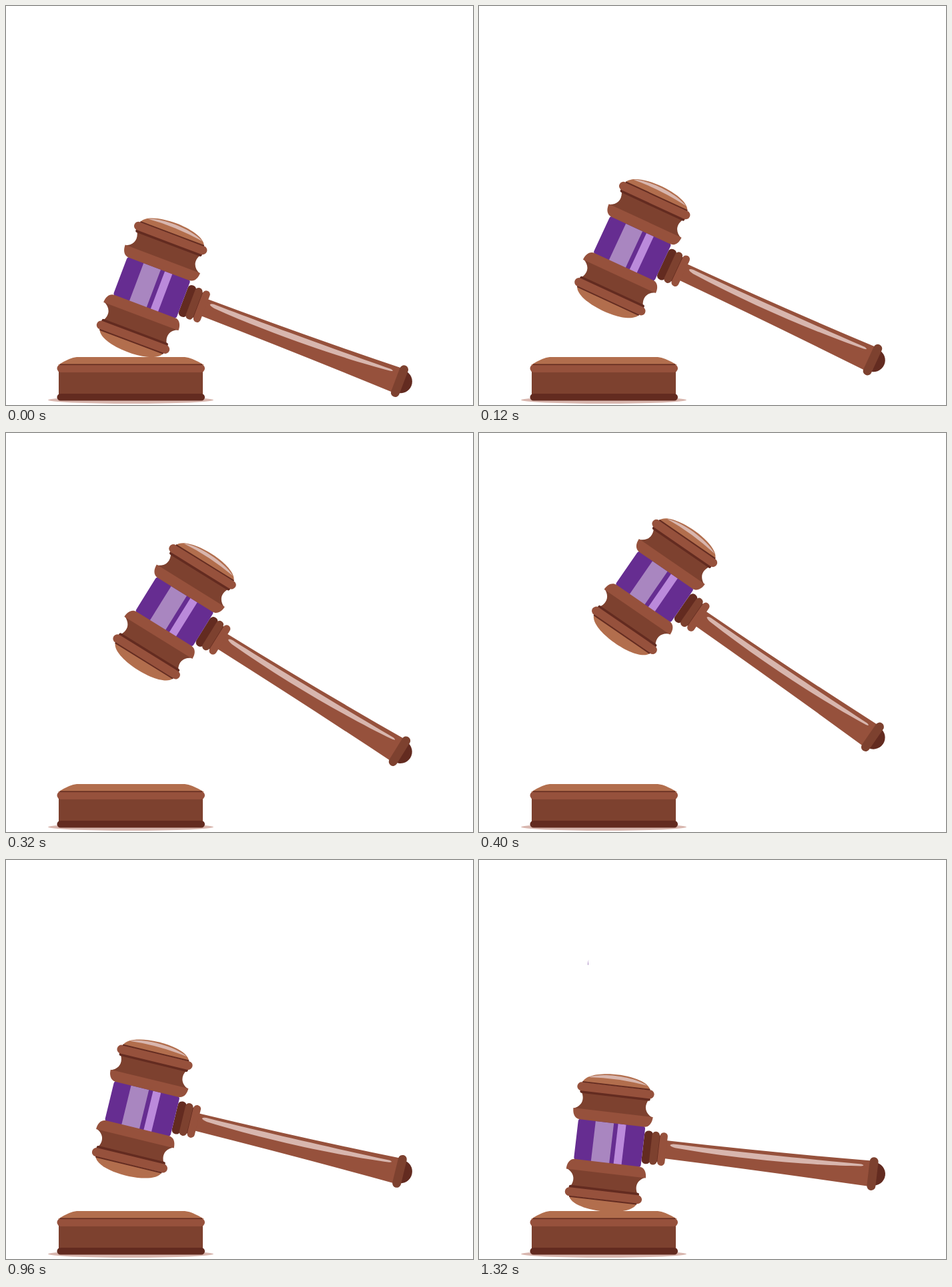
Write an HTML page that moves like this. It is 700 px wide and 599 px high and loops after 1.36 s.

```html
<!DOCTYPE html>
<html lang="en">
<head>
<meta charset="utf-8">
<title>Gavel</title>
<style>
  html, body { margin: 0; height: 100%; overflow: hidden; background: #fff; }
  svg { display: block; width: 100%; height: 100%; }
  .light { fill: #b26e4d; }
  .mid { fill: #96513c; }
  .deep { fill: #7d412f; }
  .dark { fill: #632b20; }
  .shine { fill: #d8b6ae; }
  .violet { fill: #662d91; }
</style>
</head>
<body>
<svg viewBox="0 0 700 599">
  <defs>
    <!-- one end of the head, centred on the head's axis -->
    <g id="cap">
      <path class="deep" d="M-51-72C-44-60-48-50-60-45H60C48-50 44-60 51-72Z"/>
      <path class="mid" d="M-60-46C-60-37-56-30-48-30H48C56-30 60-37 60-46Z"/>
      <rect class="dark" x="-53" y="-75" width="106" height="5.5" rx="2.5"/>
      <path class="light" d="M-51-86C-44-109 44-109 51-86Z"/>
      <rect class="mid" x="-58" y="-86" width="116" height="13" rx="6.5"/>
      <rect class="dark" x="-51" y="-87.5" width="102" height="2"/>
    </g>
    <mask id="ring" maskUnits="userSpaceOnUse" x="0" y="0" width="700" height="599">
      <rect width="700" height="599" fill="#fff"/>
      <circle id="hole" cx="132" cy="530"/>
    </mask>
  </defs>

  <ellipse class="shine" cx="187" cy="591.5" rx="124" ry="5.5"/>

  <!-- origin at the end of the handle, handle along the x axis -->
  <g id="gavel">
    <path class="mid" d="M-313-13.5Q-150-14 0-19.5V19.5Q-150 15-313 13.5Z"/>
    <path class="shine" d="M-306-7Q-305-10-296-9.5C-220-9-100-10.5-18-12.5Q-11-11-18-9.5C-90-2-200 2-298-4Q-305-5-306-7Z"/>
    <path class="dark" d="M2-17.5A17.5 17.5 0 0 1 2 17.5Z"/>
    <rect class="deep" x="-6" y="-25" width="13" height="50" rx="6.5"/>
    <rect class="dark" x="-346" y="-25" width="13" height="50" rx="6"/>
    <rect class="dark" x="-328" y="-20" width="10" height="40"/>
    <rect class="deep" x="-334.5" y="-25" width="11.5" height="50" rx="5.5"/>
    <rect class="mid" x="-322.3" y="-25" width="11.3" height="50" rx="5.5"/>
    <g transform="translate(-396.5)">
      <rect class="violet" x="-50.5" y="-31" width="101" height="62" rx="4"/>
      <path fill="#a986c0" d="M-24.5-30H3V31H-24.5Z"/>
      <path fill="#bb8adb" d="M9.5-30H21.5V31H9.5Z"/>
      <use href="#cap"/>
      <use href="#cap" transform="scale(1 -1)"/>
      <path class="shine" d="M-42-94.5C-24-103.5 24-103.5 46-92Q0-98.5-42-94.5Z"/>
    </g>
  </g>

  <path class="light" d="M78 539Q96 527.5 106 527H268Q278 527.5 297 539Z"/>
  <rect class="deep" x="79" y="546" width="216" height="38"/>
  <rect class="mid" x="76.5" y="538" width="221.5" height="12" rx="6"/>
  <rect class="dark" x="81" y="537.5" width="213" height="1.6"/>
  <rect class="dark" x="76.5" y="582" width="221.5" height="10.5" rx="5.2"/>

  <g mask="url(#ring)">
    <path id="burst" class="violet" d="M156 246Q154 310 139 403L152 373Q140 425 129 476
      Q127 455 125 436Q120 439 118 437C114 424 88 425 88 446Q72 448 70 460Q76 470 80 500
      Q70 487 62 488Q48 490 50 497Q62 500 63 512C34 508 28 542 50 548Q65 552 81 551
      Q60 562 44 586Q47 574 44 570Q30 572-10 594Q15 570 27 556Q18 554 8 557Q20 548 24 543
      Q10 533-30 532Q10 522 25 519Q32 513 33 507L19 505Q35 500 38 490Q20 489 5 479
      Q20 481 28 478Q10 470-15 452Q15 468 42 470Q36 460 16 454Q45 458 64 452
      Q56 432 38 415Q65 430 83 428Q85 390 62 321Q90 385 117 425Q140 370 156 246Z"/>
  </g>
</svg>
<script>
const LOOP = 1360, STEP = 40;
const [gavel, burst, hole] =
  ["gavel", "burst", "hole"].map(id => document.getElementById(id));
const clamp = x => Math.min(1, Math.max(0, x));
const mix = (a, b, k) => a + (b - a) * k;

function draw(t) {
  const lift = clamp(t / 400), hit = clamp((t - 840) / 160);
  const angle = mix(mix(20.7, 34.6, lift), 6.7, hit);
  const y = mix(mix(563, 456, lift), 471, hit);
  gavel.setAttribute("transform", `translate(589.5 ${y}) rotate(${angle})`);

  // the burst shoots outward while a growing hole eats it from the middle
  const p = clamp((t - 1000) / 320);
  const size = 1.34 * (1 - (1 - p) ** 4.76);
  burst.setAttribute("transform", `translate(132 530) scale(${size}) translate(-132 -530)`);
  burst.style.display = p > 0 ? "" : "none";
  hole.setAttribute("r", 374 * clamp((p - .25) / .75));
}

const start = performance.now();
function tick() {
  const t = (performance.now() - start) % LOOP;
  draw(Math.floor(t / STEP) * STEP);
  requestAnimationFrame(tick);
}
tick();
</script>
</body>
</html>
```
